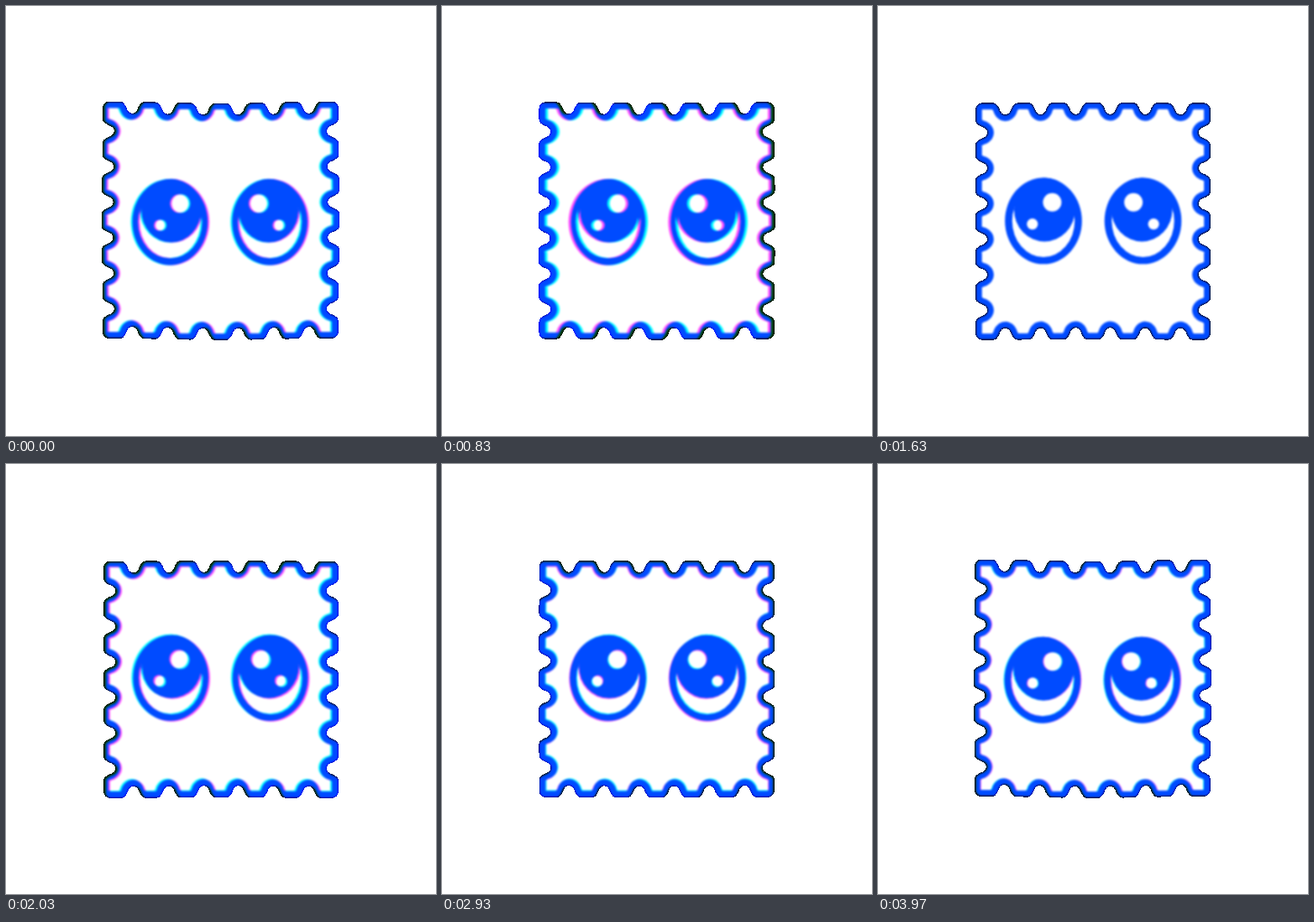
These frames come from a looping animation (512 px wide and 512 px high, 4.01 s). An HTML page:

```html
<!DOCTYPE html>
<html lang="en">
<head>
<meta charset="utf-8">
<title>Stamp with eyes</title>
<style>
  html, body { margin: 0; width: 100%; height: 100%; overflow: hidden; background: #fff; }
  svg { display: block; width: 100%; height: 100%; }
</style>
</head>
<body>
<svg viewBox="0 0 512 512">
  <defs>
    <!-- Splits red and blue apart over a hard black silhouette, which shows as a dark rim. -->
    <filter id="split" filterUnits="userSpaceOnUse" x="0" y="0" width="512" height="512" color-interpolation-filters="sRGB">
      <feGaussianBlur in="SourceAlpha" stdDeviation="0.9"/>
      <feComponentTransfer result="mask"><feFuncA type="discrete" tableValues="0 1 1 1"/></feComponentTransfer>
      <feGaussianBlur in="SourceGraphic" stdDeviation="0.9" result="soft"/>
      <feOffset id="redShift" in="soft"/>
      <feColorMatrix values="1 0 0 0 0  0 0 0 0 0  0 0 0 0 0  0 0 0 1 0" result="red"/>
      <feColorMatrix in="soft" values="0 0 0 0 0  0 1 0 0 0  0 0 0 0 0  0 0 0 1 0" result="green"/>
      <feOffset id="blueShift" in="soft"/>
      <feColorMatrix values="0 0 0 0 0  0 0 0 0 0  0 0 1 0 0  0 0 0 1 0" result="blue"/>
      <feComposite in="red" in2="green" operator="arithmetic" k2="1" k3="1"/>
      <feComposite in2="blue" operator="arithmetic" k2="1" k3="1"/>
      <feComposite in2="mask" operator="atop"/>
    </filter>
  </defs>
  <g filter="url(#split)">
    <path id="stamp" fill="#fff" stroke="#004bff" stroke-width="6.9" stroke-linejoin="round"/>
    <g id="eyes"></g>
  </g>
</svg>
<script>
const LOOP = 4010, FRAMES = 120;
const BLUE = '#004bff', WHITE = '#fff';
const MID = 256, HALF = 136.8, PITCH = 42.3;
const NOTCH_W = 11.6, NOTCH_D = 14, BEVEL = 2;
const byId = id => document.getElementById(id);

// Time in ms, then the red shift in x and y; blue shifts the other way.
const SHIFTS = [
  [0, -1.7, 0.3], [830, 3, 0.4], [1630, 0, 0], [2030, -2, -0.6],
  [2530, 2.7, -2.8], [3370, 0, 0], [3970, -1.2, 0.2], [4010, -1.7, 0.3]
];

function shiftAt(ms) {
  const i = SHIFTS.findIndex((key, k) => k > 0 && ms <= key[0]);
  const a = SHIFTS[i - 1], b = SHIFTS[i];
  const u = (ms - a[0]) / (b[0] - a[0]);
  const ease = u * u * (3 - 2 * u);
  return [1, 2].map(k => a[k] + (b[k] - a[k]) * ease);
}

// One side of the stamp as [along, depth] pairs, with bevelled tabs.
function buildSide() {
  const side = [[BEVEL - HALF, 0]];
  for (let n = 0; n < 6; n++) {
    const center = (n - 2.5) * PITCH;
    side.push([center - NOTCH_W - BEVEL, 0]);
    for (let k = 1; k < 12; k++) {
      const a = Math.PI * k / 12;
      side.push([center - NOTCH_W * Math.cos(a), NOTCH_D * Math.sin(a)]);
    }
    side.push([center + NOTCH_W + BEVEL, 0]);
  }
  side.push([HALF - BEVEL, 0]);
  return side;
}

const side = buildSide();
const outline = [0, 1, 2, 3].flatMap(turn => {
  const c = [1, 0, -1, 0][turn], s = [0, 1, 0, -1][turn];
  return side.map(([along, depth]) => {
    const y = depth - HALF;
    return [along * c - y * s, along * s + y * c];
  });
});

// Slow paper wobble between a bulged pose and a pinched one.
function warp([x, y], pinch) {
  const bulge = 1 - pinch;
  const dx = -1.5 * pinch * Math.sin(x / 64) - 0.6 * bulge
           + 0.8 * bulge * x / 140 * Math.cos(y / 43);
  const dy = (bulge - 0.4 * pinch) * Math.cos(x / 42.5) + 0.3 * pinch - 0.3 * bulge;
  return (MID + x + dx).toFixed(2) + ' ' + (MID + y + dy).toFixed(2);
}

function addEllipse(parent, fill, rx, ry) {
  const el = document.createElementNS('http://www.w3.org/2000/svg', 'ellipse');
  el.setAttribute('fill', fill);
  el.setAttribute('rx', rx);
  el.setAttribute('ry', ry);
  parent.appendChild(el);
  return el;
}

function place(el, x, y) {
  el.setAttribute('cx', x);
  el.setAttribute('cy', y);
}

function makeEye() {
  const g = byId('eyes');
  return {
    rim: addEllipse(g, BLUE, 45.8, 51.4),
    white: addEllipse(g, WHITE, 37.2, 43),
    iris: addEllipse(g, BLUE, 36.3, 38),
    glint: addEllipse(g, WHITE, 11, 11),
    spark: addEllipse(g, WHITE, 6.6, 6.6)
  };
}

function poseEye(eye, x, y, irisX, glintX, sparkX) {
  place(eye.rim, x, y);
  place(eye.white, x, y);
  place(eye.iris, x + irisX, y - 13.5);
  place(eye.glint, x + glintX, y - 22.1);
  place(eye.spark, x + sparkX, y + 3.7);
}

const leftEye = makeEye(), rightEye = makeEye();

function setShift(id, dx, dy) {
  byId(id).setAttribute('dx', dx);
  byId(id).setAttribute('dy', dy);
}

function draw(ms) {
  const frame = Math.min(FRAMES - 1, Math.floor((ms + 4) * 0.03));
  const phase = 2 * Math.PI * frame / FRAMES;
  const pinch = (1 - Math.cos(phase)) / 2;

  byId('stamp').setAttribute('d', 'M' + outline.map(p => warp(p, pinch)).join('L') + 'Z');

  const eyeY = 256.3 + 1.3 * Math.cos(phase - 0.7);
  const drift = -0.5 * Math.cos(phase - 0.6);
  poseEye(leftEye, 196.8 + drift, eyeY, 1.3, 12 - 1.7 * pinch, -11.7 - 1.6 * pinch);
  poseEye(rightEye, 315.4 + drift * 0.6, eyeY, -1.3, -13.2 + 2 * pinch, 10.8 + 2 * pinch);

  const [dx, dy] = shiftAt(frame * 100 / 3);
  setShift('redShift', dx, dy);
  setShift('blueShift', -dx, -dy);
}

const start = performance.now();
function tick() {
  draw((performance.now() - start) % LOOP);
  requestAnimationFrame(tick);
}
tick();
</script>
</body>
</html>
```
